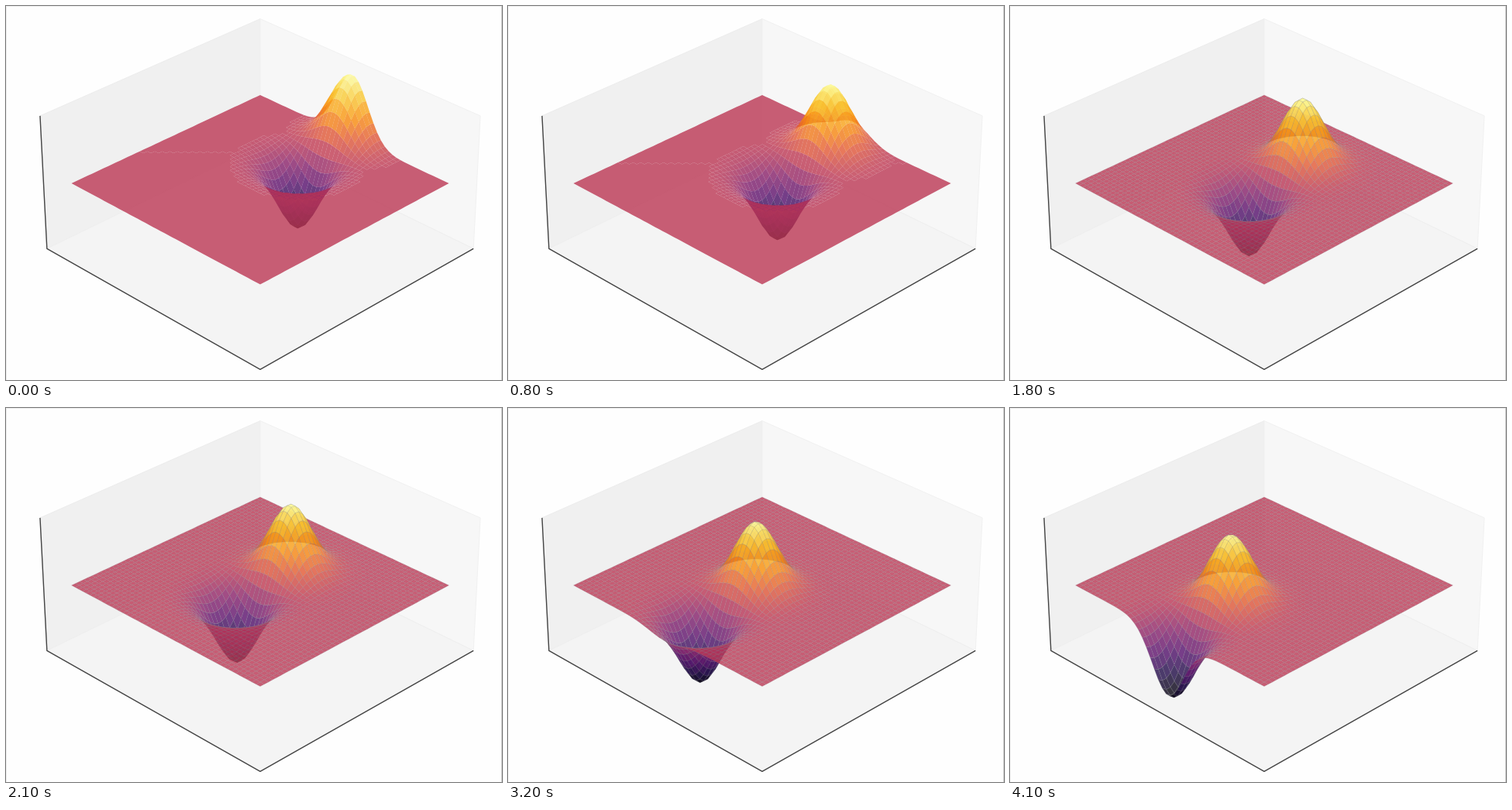
An HTML page with a canvas that plays this animation: 640x483 px, repeating every 4.2 s.

```html
<!DOCTYPE html>
<html lang="en">
<head>
<meta charset="utf-8">
<title>Moving peak and well</title>
<style>
  html, body { margin: 0; width: 100%; height: 100%; overflow: hidden; background: #fff; }
  canvas { display: block; }
</style>
</head>
<body>
<canvas id="stage" width="640" height="483"></canvas>
<script>
const ctx = document.getElementById('stage').getContext('2d');

const LOOP = 4200, STEP = 100;
const CELLS = 49;            // cells along each side of the sheet
const BUMP = 0.232;          // radius of both bumps
const ALPHA = 0.8;
const FLAT = 0.012;          // cells lower than this count as flat
const MESH_FROM = 18;        // step at which grid lines appear
const BOX = 1.148;           // box half side, relative to the sheet

// Perspective camera, 30 degrees above the ground
const CX = 328, CY = 229, DIST = 3112, HALF = 243.5, HEIGHT = 97, BOX_HEIGHT = 99;
const SIN = 0.5, COS = Math.sqrt(3) / 2;

// s grows towards the left-front edge, t towards the right-front edge
function project(s, t, zPx) {
  const right = (t - s) / 2 * HALF;
  const near = (s + t) / 2 * HALF;
  const depth = 1 - (near * COS + zPx * SIN) / DIST;
  return {
    x: CX + right / depth,
    y: CY + (near * SIN - zPx * COS) / depth,
    depth
  };
}

const INFERNO = [
  [0, 0, 4], [32, 12, 73], [87, 16, 110], [138, 34, 106], [188, 55, 84],
  [227, 89, 51], [249, 142, 9], [249, 201, 50], [252, 255, 164]
];

const lerp = (a, b, u) => a + (b - a) * u;

function inferno(v) {
  const pos = Math.min(0.9999, Math.max(0, v)) * (INFERNO.length - 1);
  const i = Math.floor(pos);
  const rgb = INFERNO[i].map((c, k) => Math.round(lerp(c, INFERNO[i + 1][k], pos - i)));
  return `rgba(${rgb},${ALPHA})`;
}

// Pairs of step and travelled share, in steps
const PACE = [[0, 0], [8, 7.4], [14, 13.7], [21, 20.1], [25, 24.8], [32, 32.2], [41, 41]];

function travel(step) {
  const i = Math.max(1, PACE.findIndex(p => p[0] >= step));
  const [a, b] = [PACE[i - 1], PACE[i]];
  return lerp(a[1], b[1], (step - a[0]) / (b[0] - a[0])) / 41;
}

const bump = (s, t, center) =>
  Math.exp(-((s - center) ** 2 + t * t) / (BUMP * BUMP));

function trace(points) {
  points.forEach((p, i) => i ? ctx.lineTo(p.x, p.y) : ctx.moveTo(p.x, p.y));
}

function polygon(points, fill, stroke) {
  ctx.beginPath();
  trace(points);
  ctx.closePath();
  ctx.fillStyle = fill;
  ctx.fill();
  if (stroke) {
    ctx.strokeStyle = stroke;
    ctx.stroke();
  }
}

function drawBox() {
  const corner = (s, t, z) => project(s * BOX, t * BOX, z * BOX_HEIGHT);
  const backTop = corner(-1, -1, 1), back = corner(-1, -1, -1);
  const leftTop = corner(1, -1, 1), left = corner(1, -1, -1);
  const rightTop = corner(-1, 1, 1), right = corner(-1, 1, -1);
  const front = corner(1, 1, -1);

  ctx.fillStyle = '#fefefe';
  ctx.fillRect(0, 0, 640, 483);
  ctx.lineWidth = 1;
  ctx.lineJoin = 'round';
  polygon([leftTop, backTop, back, left], '#f0f0f0', '#ececec');
  polygon([backTop, rightTop, right, back], '#f7f7f7', '#f1f1f1');
  polygon([left, back, right, front], '#f4f4f4', '#efefef');

  ctx.beginPath();
  trace([leftTop, left, front, right]);
  ctx.strokeStyle = '#444';
  ctx.lineWidth = 1.4;
  ctx.stroke();

  ctx.fillStyle = '#eee';
  ctx.fillRect(0, 0, 640, 1);
  ctx.fillRect(0, 0, 1, 483);
  ctx.fillStyle = '#c4c4c4';
  ctx.fillRect(639, 0, 1, 483);
}

function buildCells(peak, well) {
  const grid = [];
  for (let i = 0; i <= CELLS; i++) {
    grid.push([]);
    for (let j = 0; j <= CELLS; j++) {
      const s = i / CELLS * 2 - 1, t = j / CELLS * 2 - 1;
      const z = bump(s, t, peak) - bump(s, t, well);
      grid[i].push({ ...project(s, t, z * HEIGHT), z, near: (s + t) / 2 });
    }
  }
  const cells = [];
  for (let i = 0; i < CELLS; i++) {
    for (let j = 0; j < CELLS; j++) {
      const points = [grid[i][j], grid[i + 1][j], grid[i + 1][j + 1], grid[i][j + 1]];
      const mean = key => points.reduce((sum, p) => sum + p[key], 0) / 4;
      cells.push({
        points,
        z: mean('z'),
        depth: mean('depth'),
        near: mean('near'),
        flat: points.every(p => Math.abs(p.z) < FLAT)
      });
    }
  }
  return cells.sort((a, b) => b.depth - a.depth);
}

function drawFlat(cells) {
  ctx.beginPath();
  for (const cell of cells) {
    trace(cell.points);
    ctx.closePath();
  }
  ctx.fillStyle = inferno(0.5);
  ctx.fill();
}

function drawCells(cells, stroke) {
  for (const cell of cells) polygon(cell.points, inferno((cell.z + 1) / 2), stroke);
}

function drawSurface(step) {
  const share = travel(step);
  const peak = lerp(-0.962, 0.346, share);
  const well = lerp(-0.414, 0.94, share);
  const cells = buildCells(peak, well);

  if (step >= MESH_FROM) {
    ctx.lineWidth = 0.5;
    drawCells(cells, 'rgba(140,140,145,0.36)');
    return;
  }
  // Seamless plain: the part behind the bumps first, the part in front last
  const middle = (peak + well) / 4;
  drawFlat(cells.filter(c => c.flat && c.near < middle));
  drawCells(cells.filter(c => !c.flat));
  drawFlat(cells.filter(c => c.flat && c.near >= middle));
}

let shown = -1;

function tick() {
  const step = Math.floor(performance.now() % LOOP / STEP);
  if (step !== shown) {
    shown = step;
    drawBox();
    drawSurface(step);
  }
  requestAnimationFrame(tick);
}

tick();
</script>
</body>
</html>
```
